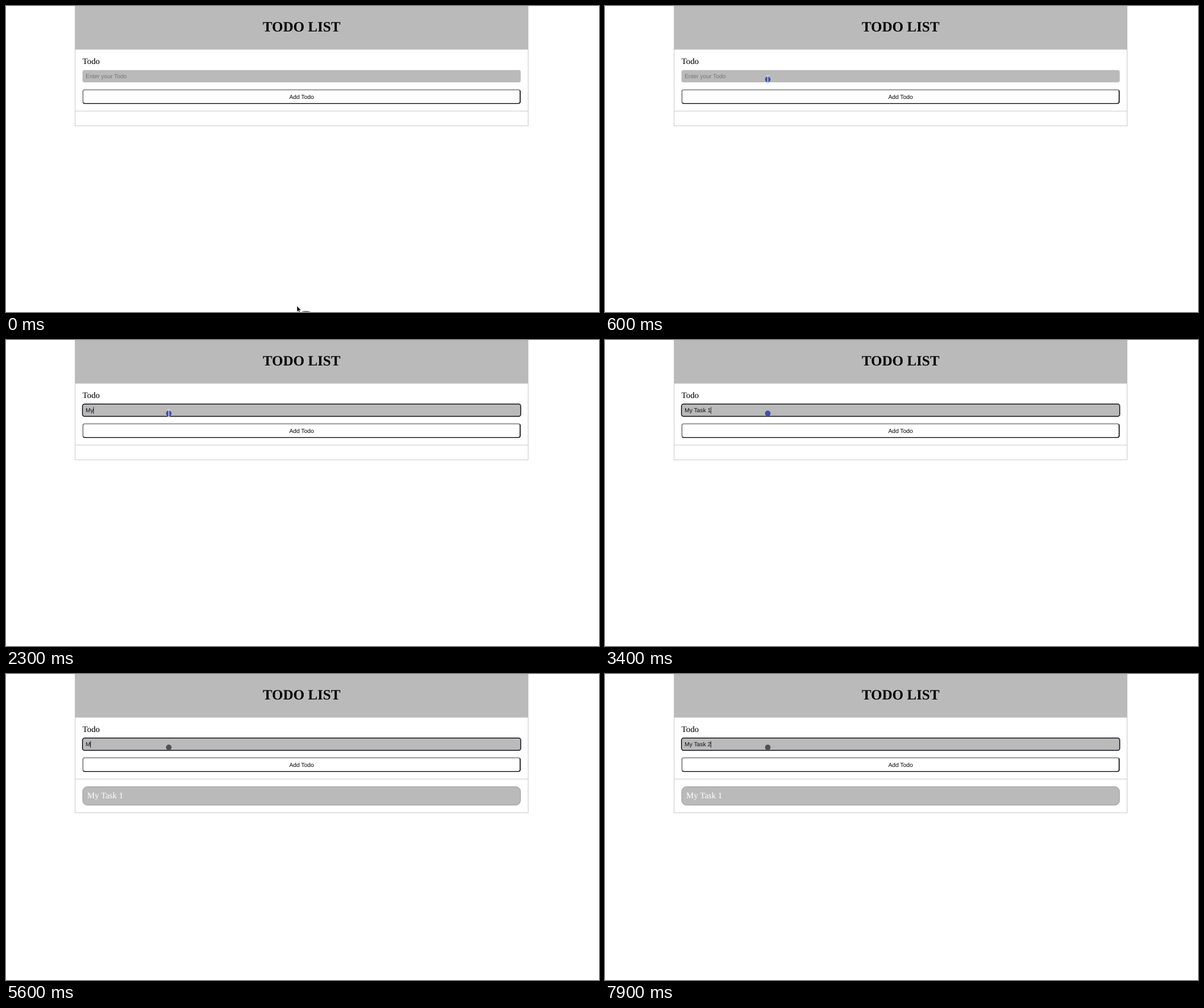
An HTML page for the animation above (8 s loop, 1000 by 517 pixels).

```html
<!DOCTYPE html>
<html lang="en">
<head>
<meta charset="utf-8">
<title>Todo list</title>
<style>
  html, body { margin: 0; width: 100%; height: 100%; overflow: hidden; background: #fff; }
  svg { display: block; width: 100vw; height: 100vh; }
  text { white-space: pre; text-rendering: geometricPrecision; }
  .serif { font: 14.3px "Liberation Serif", serif; }
  .sans { font: 9.87px "Liberation Sans", sans-serif; }
  .title { font: bold 24px "Liberation Serif", serif; text-anchor: middle; }
  .fill { fill: #bababa; }
  .line { fill: none; stroke: #ccc; }
</style>
</head>
<body>
<svg viewBox="0 0 1000 517">
  <rect id="panel" class="line" x="116.5" y="-5" width="764" height="207.5"/>
  <rect class="fill" x="116.5" y="0" width="764" height="73.6"/>
  <text class="title" x="498.5" y="43.1">TODO LIST</text>
  <path class="line" d="M117 177.5H880"/>

  <text class="serif" x="129" y="98.3">Todo</text>
  <rect id="field" class="fill" x="129" y="108.2" width="739" height="20.8" rx="3.5" stroke-width="1.5"/>
  <text id="entry" class="sans" x="134.2" y="122.3"></text>
  <path id="caret" stroke="#000" stroke-width=".8" d="M0 113.4V124.6"/>

  <rect id="face" x="129.7" y="141.6" width="737.4" height="23" rx="3" stroke="#6a6a6a" stroke-width="1.4"/>
  <path fill="none" stroke="#111" stroke-width="1.4" d="M130.6 163.7Q131.3 164.6 132.7 164.6H864.1Q867.1 164.6 867.1 161.6V144.6Q867.1 143.2 866.2 142.5"/>
  <text id="label" class="sans" x="498.5" y="156.6" text-anchor="middle">Add Todo</text>

  <g id="item">
    <rect class="fill" x="129.4" y="190.4" width="738.2" height="31.2" rx="8" stroke="#8a8a8a" stroke-width=".8"/>
    <text class="serif" x="137" y="210.2" fill="#fff">My Task 1</text>
  </g>

  <circle id="dot"/>
  <g id="pointer" stroke-linejoin="round">
    <path id="arrow" fill="#111" stroke="#fff" stroke-width=".7" d="M0 0V10.5L2.4 8.3L4 11.7L5.7 11L4.2 7.6H7.4Z"/>
    <path id="hand" fill="#fff" stroke="#222" stroke-width=".9" d="M-1.2 1Q0 -.8 1.3 .6L3.6 4L7.5 3.6Q10 4 10 6.5L9 10Q8 12 5.5 12L2.5 11.5L-2 8.3Q-2.2 6.7 -.3 7L1.4 7.6Z"/>
    <path id="beam" fill="none" stroke="#dcdce2" stroke-width="1.3" d="M-2.5 -6H2.5M0 -6V6M-2.5 6H2.5"/>
  </g>
</svg>
<script>
const LOOP = 8000, STEP = 100, BLINK = 600;
const FOCUS = 700, RELEASE = 900, ENTER = 3900;
const TRAVEL = 468, LAG = 22;
const DOT = 4.7, RIPPLE = 13.3, RIPPLE_TIME = 400;

const $ = id => document.getElementById(id);
const show = (id, on) => $(id).setAttribute('visibility', on ? 'visible' : 'hidden');
const set = (id, attrs) => {
  for (const name in attrs) $(id).setAttribute(name, attrs[name]);
};

// The first letter lands alone; the others follow at an even pace.
const keyTimes = (text, first, next, pace) =>
  [...text].map((_, i) => i ? next + (i - 1) * pace : first);

const runs = [
  { text: 'My Task 1', keys: keyTimes('My Task 1', 1900, 2200, 160) },
  { text: 'My Task 2', keys: keyTimes('My Task 2', 5600, 6500, 190) }
];
const caretResets = [FOCUS, ENTER, ...runs.flatMap(run => run.keys)];

function pointerAt(t) {
  const left = Math.max(0, 1 - t / TRAVEL) ** 1.5;
  return [274.5 + 216 * left, 124 + 382.5 * left];
}

function dotRadius(t) {
  const age = t < RELEASE ? t : t - RELEASE;
  return DOT + RIPPLE * Math.max(0, 1 - age / RIPPLE_TIME);
}

function caretOn(t) {
  const last = Math.max(...caretResets.filter(time => time <= t));
  return t >= FOCUS && Math.floor((t - last) / BLINK) % 2 === 0;
}

function render(time) {
  const t = Math.floor(time % LOOP / STEP) * STEP;
  const added = t >= ENTER;

  const run = runs[added ? 1 : 0];
  const typed = run.text.slice(0, run.keys.filter(key => key <= t).length);
  $('entry').textContent = typed || 'Enter your Todo';
  set('entry', { fill: typed ? '#111' : '#757575' });
  const caretX = 134.4 + (typed ? $('entry').getComputedTextLength() : 0);
  set('caret', { transform: `translate(${caretX} 0)` });
  show('caret', caretOn(t));
  set('field', { stroke: t >= FOCUS ? '#15151c' : 'none' });

  show('item', added);
  set('panel', { height: added ? 239.5 : 207.5 });

  const [x, y] = pointerAt(t);
  const overButton = y > 141 && y < 165;
  const overField = y < 129;
  set('face', { fill: overButton ? '#bababa' : '#fff' });
  set('label', { fill: overButton ? '#fff' : '#000' });
  set('pointer', { transform: `translate(${x} ${y})` });
  show('hand', overButton);
  show('beam', overField && t < 3000);
  show('arrow', !overButton && !overField);

  const [cx, cy] = pointerAt(t - LAG);
  const r = dotRadius(t);
  const wide = r > DOT;
  set('dot', {
    cx, cy, r,
    fill: added ? '#505050' : '#3f4fae',
    'fill-opacity': wide ? 0.55 : 1,
    stroke: wide ? '#45454f' : 'none'
  });
}

const start = performance.now();
function tick() {
  render(performance.now() - start);
  requestAnimationFrame(tick);
}
tick();
</script>
</body>
</html>
```
